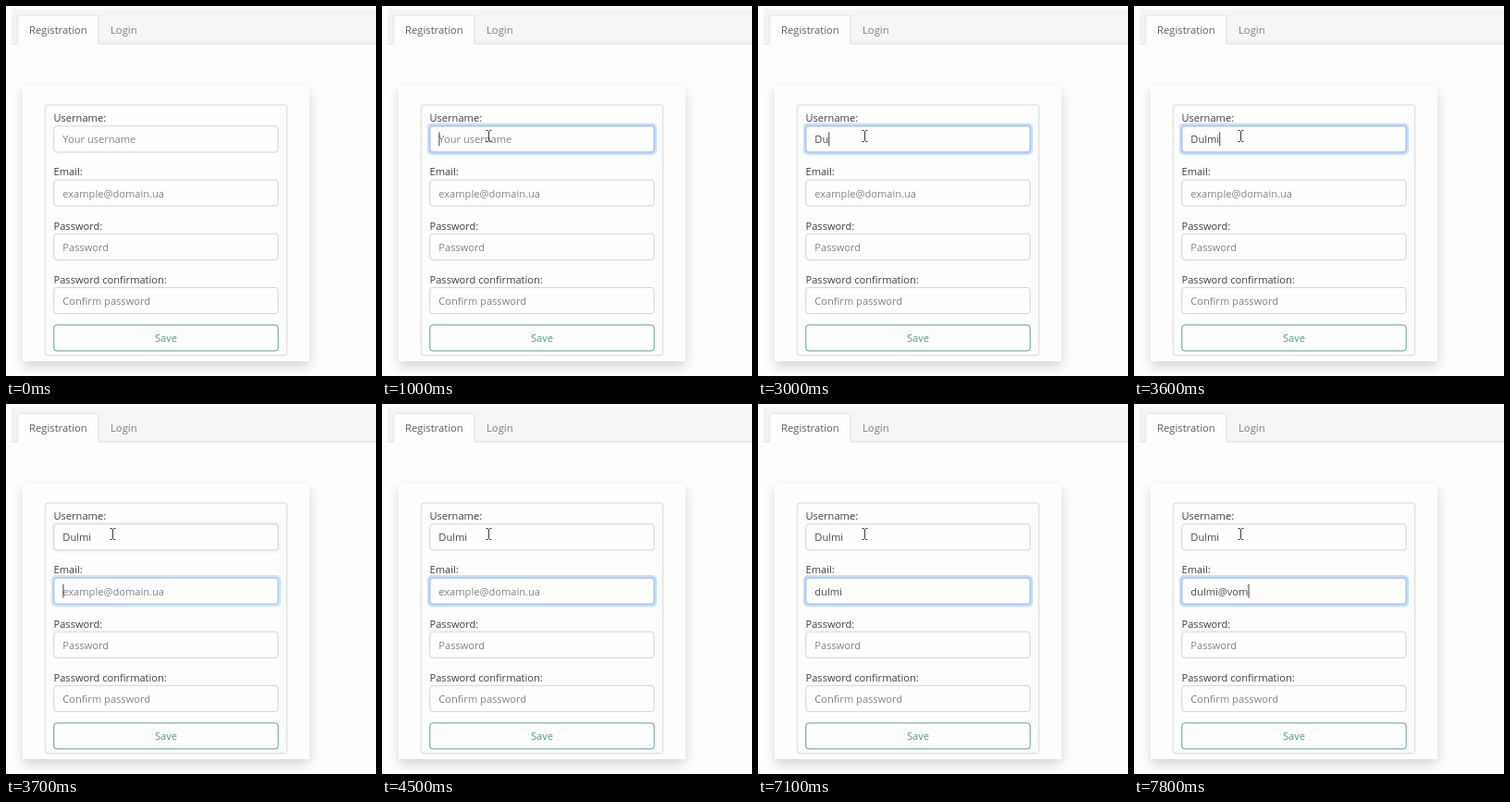
Write an HTML page with a canvas that moves like this. It is 400 by 400 pixels and loops after 8 s.

```html
<!DOCTYPE html>
<html lang="en">
<head>
<meta charset="utf-8">
<title>Registration form</title>
<style>
  html, body { margin: 0; width: 100%; height: 100%; overflow: hidden; background: #fefefe; }
  canvas { display: block; width: 400px; height: 400px; }
</style>
</head>
<body>
<canvas id="stage"></canvas>
<script>
const LOOP = 8000, BLINK = 263.5, FADE = 75;
const FIELD = { x: 51.8, w: 242.4, h: 28.2, top: 129.8, step: 58.2 };
const CLICK = 800, TAB = 3645;

const rows = [
  { label: 'Username:', hint: 'Your username', from: CLICK, to: TAB,
    text: 'Dulmi', keys: [2900, 3000, 3200, 3300, 3500] },
  { label: 'Email:', hint: 'example@domain.ua', from: TAB, to: LOOP,
    text: 'dulmi@vom', keys: [6000, 6200, 6500, 6800, 6800, 7400, 7500, 7600, 7700] },
  { label: 'Password:', hint: 'Password' },
  { label: 'Password confirmation:', hint: 'Confirm password' }
];

const canvas = document.getElementById('stage');
const ctx = canvas.getContext('2d');
const dpr = window.devicePixelRatio || 1;
canvas.width = canvas.height = 400 * dpr;

function box(x, y, w, h, r, fill, stroke, line = 1) {
  ctx.beginPath();
  ctx.roundRect(x, y, w, h, r);
  if (fill) { ctx.fillStyle = fill; ctx.fill(); }
  if (stroke) { ctx.strokeStyle = stroke; ctx.lineWidth = line; ctx.stroke(); }
}

function write(text, x, y, color, size = 11.1, align = 'left') {
  ctx.font = `${size}px "Open Sans", "Noto Sans", sans-serif`;
  ctx.textAlign = align;
  ctx.fillStyle = color;
  ctx.fillText(text, x, y);
}

function drawTabs() {
  ctx.fillStyle = '#f5f5f5';
  ctx.fillRect(6, 3.5, 394, 37.5);
  ctx.fillStyle = '#e2e2e2';
  ctx.fillRect(6, 40.5, 394, 1);
  box(12.3, 10, 87.5, 34, [3, 3, 0, 0], '#fefefe', '#e0e0e0');
  ctx.fillStyle = '#fefefe';
  ctx.fillRect(10, 41.5, 92, 4);
  write('Registration', 25, 30, '#575c61', 11.25);
  write('Login', 113, 30, '#7e8082', 11.25);
}

function drawCard() {
  ctx.save();
  ctx.shadowColor = 'rgba(0,0,0,.16)';
  ctx.shadowBlur = 12 * dpr;
  ctx.shadowOffsetY = 6 * dpr;
  ctx.fillStyle = '#fefefe';
  ctx.fillRect(18, 86, 310, 298);
  ctx.restore();
  box(42.3, 107, 261.4, 270.7, 3, null, '#d6d7d9');
}

// Focus strength, 0 to 1, eased at both ends of the focused span.
function focusLevel(row, t) {
  if (row.from === undefined) return 0;
  const ease = p => { p = Math.min(1, Math.max(0, p)); return p * p * (3 - 2 * p); };
  const out = row.to < LOOP ? ease((t - row.to) / FADE) : 0;
  return ease((t - row.from) / FADE) - out;
}

function drawRow(row, i, t) {
  const { x, w, h } = FIELD;
  const y = FIELD.top + i * FIELD.step;
  const glow = focusLevel(row, t);

  if (glow > 0) {
    ctx.globalAlpha = glow;
    box(x - 3, y - 3, w + 6, h + 6, 5, '#c7defd');
    ctx.globalAlpha = 1;
  }
  box(x, y, w, h, 3, '#fefefe', '#d2d5d8');
  if (glow > 0) {
    ctx.globalAlpha = glow;
    box(x, y, w, h, 3, null, '#8fbafa');
    ctx.globalAlpha = 1;
  }

  write(row.label, 51.5, y - 4.6, '#3b3e41');
  const struck = (row.keys || []).filter(k => k <= t);
  const typed = struck.length ? row.text.slice(0, struck.length) : '';
  write(typed || row.hint, 61.3, y + 18.6, typed ? '#44484c' : '#7f8488');

  if (t >= row.from && t < row.to) {
    const last = struck.length ? struck[struck.length - 1] : row.from;
    if (Math.floor((t - last) / BLINK) % 2 === 0) {
      const cx = 61.4 + (typed ? ctx.measureText(typed).width : 0);
      ctx.fillStyle = '#3c4043';
      ctx.fillRect(cx, y + 6.6, 1, 15);
    }
  }
}

function drawPointer(x, y) {
  ctx.strokeStyle = '#3a3a3a';
  ctx.lineWidth = 1;
  ctx.beginPath();
  for (const s of [-1, 1]) {
    ctx.moveTo(x - 3, y + s * 6);
    ctx.lineTo(x - 1, y + s * 6);
    ctx.lineTo(x, y + s * 5);
    ctx.lineTo(x + 1, y + s * 6);
    ctx.lineTo(x + 3, y + s * 6);
  }
  ctx.moveTo(x, y - 5);
  ctx.lineTo(x, y + 5);
  ctx.stroke();
}

function draw(t) {
  ctx.setTransform(dpr, 0, 0, dpr, 0, 0);
  ctx.fillStyle = '#fefefe';
  ctx.fillRect(0, 0, 400, 400);
  drawTabs();
  drawCard();
  rows.forEach((row, i) => drawRow(row, i, t));
  box(51.8, 344.9, 242.4, 28, 3, null, '#5ba388');
  write('Save', 173, 363, '#559a7f', 11.1, 'center');
  if (t >= CLICK) drawPointer(115.5, 140.5);
}

const start = performance.now();
function tick() {
  draw((performance.now() - start) % LOOP);
  requestAnimationFrame(tick);
}
tick();
</script>
</body>
</html>
```
